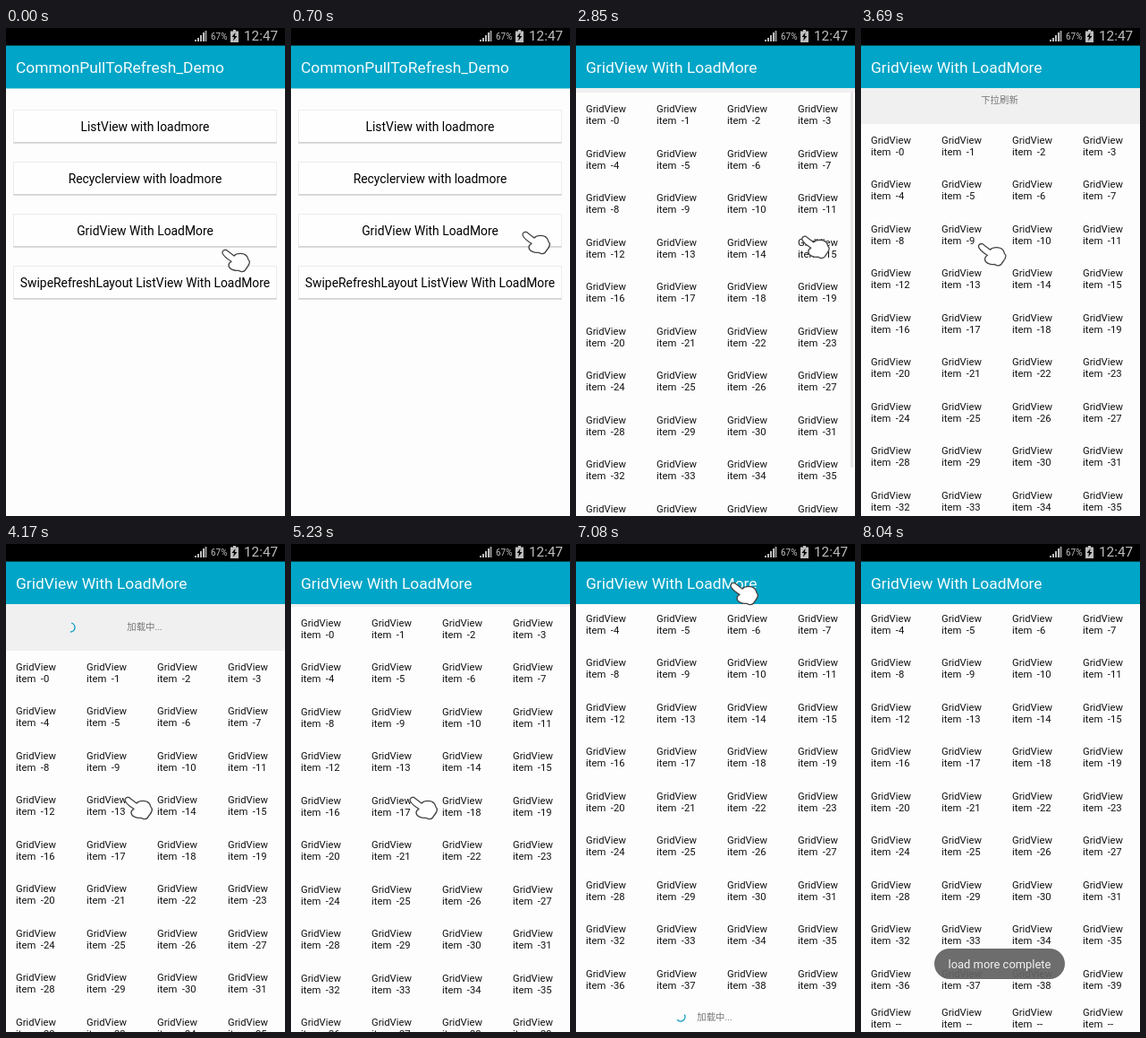
An HTML page that plays this animation: 312x544 px, repeating every 8.51 s.

```html
<!DOCTYPE html>
<html lang="en">
<head>
<meta charset="utf-8">
<title>Pull to refresh demo</title>
<style>
html, body { margin: 0; width: 100%; height: 100%; overflow: hidden; background: #fdfdfd; }
body { position: relative; font-family: Roboto, "Noto Sans CJK SC", "Noto Sans CJK", sans-serif; color: #111; }
div, svg { position: absolute; }
.status { left: 0; top: 0; width: 312px; height: 19px; background: #000; color: #bdbdbd; }
.status div { white-space: nowrap; line-height: 19px; }
.page { left: 0; top: 19px; width: 312px; height: 525px; background: #fdfdfd; }
.bar { left: 0; top: 0; width: 312px; height: 47px; background: #00a5c7;
  border-top: 1px solid #00434f; border-bottom: 1px solid #8fd6e4; }
.bar div { left: 11px; top: -1px; line-height: 50px; font-size: 17.4px; color: #f6fcfd; white-space: nowrap; }
#detail { box-shadow: 0 -2px #056c82; }
.button { left: 8px; width: 293px; height: 35px; border: 1px solid #ececec; border-bottom-color: #d4d4d4;
  box-shadow: 0 1px #dcdcdc; border-radius: 1px; background: #fefefe;
  line-height: 36px; text-align: center; font-size: 13.87px; color: #000; white-space: nowrap; }
#list { left: 0; top: 48px; width: 312px; height: 477px; overflow: hidden; }
#head { left: 0; top: 0; width: 312px; height: 52px; background: #f0f0f0; }
#headText, #footText { left: 0; width: 310px; text-align: center; font-size: 10.4px; color: #777; }
#headText { line-height: 52px; }
#grid { left: 0; top: 0; width: 312px; height: 600px; background: #fdfdfd; }
.cell { white-space: pre; font-size: 11.27px; line-height: 13px; }
#foot { left: 0; top: 495px; width: 312px; height: 35px; }
#footText { line-height: 35px; }
.spin { width: 14px; height: 14px; }
.spin path { fill: none; stroke: #1ba3c4; stroke-width: 1.5; }
#thumb { left: 307px; top: 0; width: 3px; height: 418px; background: #d8d8d8; }
#toast { left: 82px; top: 451px; width: 146px; height: 34px; border-radius: 17px; background: rgba(98,98,98,.93);
  color: #f4f4f4; font-size: 12.93px; line-height: 35px; text-align: center; white-space: nowrap; }
#hand { left: 0; top: 0; width: 34px; height: 29px; overflow: visible; }
#hand path { fill: #fff; stroke: #444; stroke-width: 1.3; stroke-linejoin: round; }
</style>
</head>
<body>
<div class="page" id="menu">
  <div class="bar"><div>CommonPullToRefresh_Demo</div></div>
</div>

<div class="page" id="detail">
  <div class="bar"><div>GridView With LoadMore</div></div>
  <div id="list">
    <div id="head">
      <svg class="spin" id="headSpin" style="left:65px;top:19px" viewBox="-7 -7 14 14"><path d="M1 -4.9A5 5 0 0 1 0 5"/></svg>
      <div id="headText"></div>
    </div>
    <div id="grid">
      <div id="foot">
        <svg class="spin" id="footSpin" style="left:110px;top:10px" viewBox="-7 -7 14 14"><path d="M1 -4.9A5 5 0 0 1 0 5"/></svg>
        <div id="footText"></div>
      </div>
    </div>
    <div id="thumb"></div>
  </div>
</div>

<div id="toast">load more complete</div>

<div class="status">
  <svg style="left:208px;top:0" width="56" height="19" fill="#bdbdbd">
    <path d="M3 15v-2h2v2zM6 15v-4h2v4zM9 15v-7h2v7zM12 15v-10h2v10z"/>
    <path d="M14.5 15V3h2v12z" fill="#999"/>
    <path d="M46 2h3v1.5h3V16h-9V3.5h3z"/>
    <path d="M48.5 5l-4 5h2.500l-1 4.500 4.500-5.500h-2.500z" fill="#000"/>
  </svg>
  <div style="left:229px;font-size:10px">67%</div>
  <div style="left:266px;font-size:15.3px">12:47</div>
</div>

<svg id="hand" viewBox="0 0 34 29">
  <path d="M1.500 6C0 3 2.500 .7 5.500 1.500L14 8C17 4.500 25 4.500 28 8C30 10 29 12 31.300 14C32 19 28 20.500 26.500 24C24 26.700 20.500 25.500 19 24.300C14 25 8 22.500 8 18.500C8 16 9.500 15 11 14.300C8 12.500 4 10 1.500 6Z"/>
</svg>

<script>
const LOOP = 8510, REST = 51.5, ROW = 49.5, COL = 79, END = 52;

// Moments of the story, in ms
const OPEN = 1320, AUTO = 1640, LOADED = 2255, DRAG = 3300, DROP = 3900,
  RELOAD = 4140, RELOADED = 4460, SWIPE = 5930, MORE = 6250, MORE_DONE = 7300;

const el = id => document.getElementById(id);
const half = v => Math.round(v * 2) / 2;
const ramp = (t, a, b) => Math.min(1, Math.max(0, (t - a) / (b - a)));
const decay = (t, from, tau) => Math.exp(-Math.max(0, t - from) / tau);
const move = (id, x, y) => { el(id).style.transform = `translate(${x}px,${y}px)`; };
const show = (node, on) => { node.style.visibility = on ? 'inherit' : 'hidden'; };

function add(parent, cls, text, left, top) {
  const d = document.createElement('div');
  d.className = cls;
  d.textContent = text;
  d.style.left = left + 'px';
  d.style.top = top + 'px';
  parent.append(d);
  return d;
}

['ListView with loadmore', 'Recyclerview with loadmore', 'GridView With LoadMore',
  'SwipeRefreshLayout ListView With LoadMore'].forEach((text, i) =>
  add(el('menu'), 'button', text, 8, 72 + i * 58));

const cell = (i, text, inset) =>
  add(el('grid'), 'cell', 'GridView\nitem  -' + text, 11 + i % 4 * COL, Math.floor(i / 4) * ROW + inset);
for (let i = 0; i < 40; i++) cell(i, i, 12);
const extra = [40, 41, 42, 43].map(i => cell(i, '-\nadd', 6));

// The screen refreshes in coarse ticks
function hold(t) {
  const [from, step] = t < OPEN ? [100, 120] : [OPEN, 117.6];
  return Math.max(0, from + Math.floor((t - from) / step) * step);
}

function pullAt(t) {
  if (t < LOADED) return REST * (1 - decay(t, AUTO, 90));
  if (t < DRAG) return REST * decay(t, LOADED, 250);
  if (t < RELOADED) return 64 * ramp(t, DRAG, DROP) - (64 - REST) * ramp(t, DROP, RELOAD);
  return REST * decay(t, RELOADED, 250);
}

function handAt(t) {
  let x = 241, y = 246;
  const glide = (from, to, nx, ny) => {
    const p = ramp(t, from, to);
    x += (nx - x) * p;
    y += (ny - y) * p;
  };
  glide(0, 340, 258, 226);
  if (t >= 580 && t < 700) glide(0, 1, 249, 215);
  glide(LOADED, 2848, 252, 231);
  glide(2848, DRAG, 128, 171);
  glide(DRAG, DROP, 132, 281);
  glide(5340, SWIPE, 152, 269);
  glide(SWIPE, 6024, 155, 226);
  glide(6024, 6965, 172, 42);
  glide(6965, 7905, 256, 510);
  glide(7905, 8020, 262, 570);
  return [x, y];
}

function headLabel(t, pull) {
  if (t < LOADED || (t >= RELOAD && t < RELOADED)) return '加载中...';
  if (t < DRAG || t >= RELOADED) return '更新完成';
  return pull > 61 || t > DROP ? '释放刷新' : '下拉刷新';
}

function thumbAlpha(t) {
  const from = t < SWIPE ? LOADED : SWIPE;
  return t < from ? 0 : 1 - ramp(t, from + 500, from + 750);
}

function draw(t) {
  show(el('detail'), t >= OPEN);
  el('detail').style.opacity = .5 + ramp(t, OPEN, OPEN + 117) / 2;
  move('detail', 0, Math.round(24 * decay(t, OPEN, 95)));

  const pull = half(pullAt(t)), scroll = half(END * (1 - decay(t, SWIPE, 98)));
  const label = headLabel(t, pull), more = t >= MORE_DONE;
  show(el('grid'), t >= LOADED);
  el('grid').style.top = pull - scroll + 'px';
  el('head').style.top = pull - 52 + 'px';
  el('headText').textContent = label;
  show(el('headSpin'), label === '加载中...');

  const turn = `rotate(${(t - RELOAD) * .4}deg)`;
  el('headSpin').style.transform = el('footSpin').style.transform = turn;
  el('footText').textContent = t < MORE ? '点击加载更多' : '加载中...';
  show(el('foot'), !more);
  show(el('footSpin'), t >= MORE && !more);
  extra.forEach(c => show(c, more));

  el('thumb').style.opacity = thumbAlpha(t);
  move('thumb', 0, pull + scroll * .95);
  el('toast').style.opacity = ramp(t, MORE_DONE, MORE_DONE + 220);
  move('hand', ...handAt(t));
}

const start = performance.now();
function frame() {
  draw(hold((performance.now() - start) % LOOP));
  requestAnimationFrame(frame);
}
frame();
</script>
</body>
</html>
```
